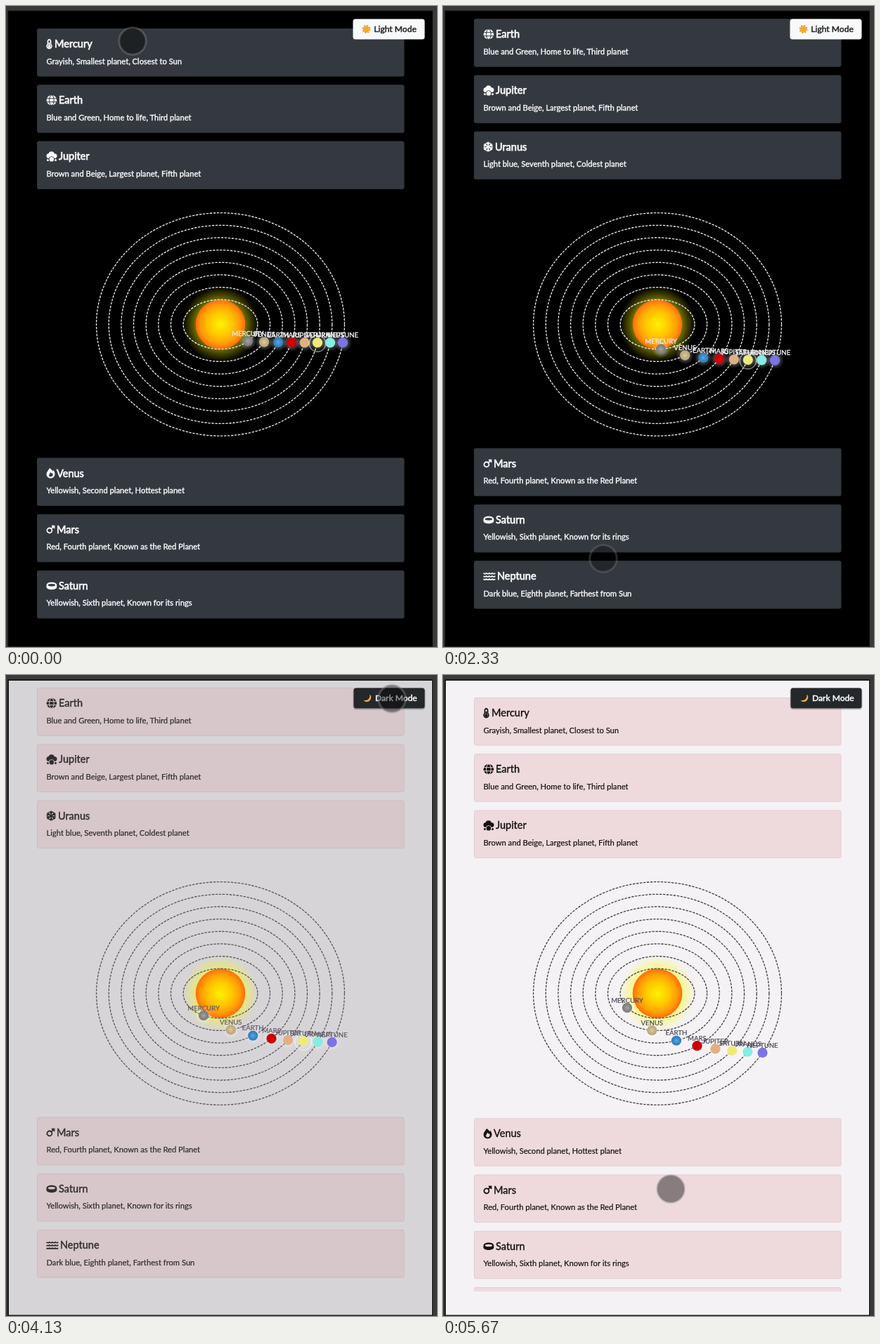
An HTML page for the animation above (5.74 s loop, 613 by 913 pixels).

```html
<!DOCTYPE html>
<html lang="en">
<head>
<meta charset="utf-8">
<title>Solar system</title>
<style>
html, body { margin: 0; width: 100%; height: 100%; overflow: hidden; background: #3a3a3a; }
svg { display: block; font-family: Lato, "Open Sans", sans-serif; }
.page { fill: var(--page); }
.card { fill: var(--card); stroke: var(--edge); }
.ink, text { fill: var(--ink); }
.line { fill: none; stroke: var(--ink); stroke-width: 1.8; }
.hole { fill: var(--card); }
.cut { fill: none; stroke: var(--card); stroke-width: 1; }
.title { font-size: 14.5px; stroke: var(--ink); stroke-width: calc(var(--bold) * 1.5px); }
.fact { font-size: 11.2px; stroke: var(--ink); stroke-width: calc(var(--bold) * .8px); }
.orbit { fill: none; stroke: var(--orbit); stroke-width: 1.3; stroke-dasharray: 3.4 1.6; }
.name { font-size: 9.6px; text-anchor: middle; fill: var(--name); stroke: var(--name); stroke-width: calc(var(--bold) * .8px); }
.mode { font-size: 12.1px; stroke-width: .5px; }
</style>
</head>
<body>
<svg id="stage" width="613" height="913" viewBox="0 0 613 913"></svg>
<script>
const LOOP = 5740, FRAME = 200 / 3, LAST = 85;
const CX = 305, CY = 453.5, MAX_SCROLL = 94, CLICK = 3870;

const icons = {
  thermometer: `<path class="line" d="M2-4a2 2 0 0 1 4 0v4.6a3.3 3.3 0 1 1-4 0z"/>
    <circle class="ink" cx="4" cy="3.4" r="2"/><path class="line" d="M4 3v-5"/>`,
  globe: `<circle class="ink" cx="7.4" r="7.3"/><ellipse class="cut" cx="7.4" rx="3.3" ry="7.3"/>
    <path class="cut" d="M0-2.5h15M0 2.5h15"/>`,
  cloud: `<g class="ink"><circle cx="3.5" cy="-.8" r="3.5"/><circle cx="7.2" cy="-3" r="4.1"/>
    <circle cx="11.6" cy="-.8" r="3.4"/><path d="M3-2h9v4.7H3z"/><circle cx="2" cy="5.2" r="1.5"/>
    <circle cx="13" cy="5.2" r="1.5"/><circle class="cut" cx="7.4" cy="4" r="3.8"/><circle cx="7.4" cy="4" r="3.2"/></g>`,
  snow: [0, 60, 120].map(a => `<path class="line" transform="translate(6.7) rotate(${a})"
    d="M0-7V7M-2.5-6L0-3.6 2.5-6M-2.5 6L0 3.6 2.5 6"/>`).join(""),
  flame: `<path class="ink" d="M4.6-7.2C6.5-6 8-4.4 8.8-3L10-4.4C11.6-2 12-.2 12 1.4A6 5.8 0 0 1 0 1.4C0-1.6 3-4.4 4.6-7.2z"/>
    <path class="hole" d="M6-1.6L7.4.4 8.4-.4C10.4 3.6 8 5 6 5S2 3.4 6-1.6z"/>`,
  mars: `<g class="line"><circle cx="4.4" cy="1.3" r="3.5"/><path d="M7-1.3L11-5M7.4-5H11v3.6"/></g>`,
  ring: `<path class="ink" d="M0-1C0-6.6 14.8-6.6 14.8-1V1.6C14.8 6.6 0 6.6 0 1.6z"/>
    <ellipse class="hole" cx="7.4" cy="-1.2" rx="5.2" ry="1.8"/>`,
  water: [-4.2, 0, 4.2].map(y => `<path class="line" d="M0 ${y}q2 1.6 4.2 0 2 1.6 4.2 0 2 1.6 4.2 0 2 1.6 4.2 0"/>`).join("")
};

// name, icon, title offset, fact, planet colour
const planets = [
  ["Mercury", "thermometer", 12, "Grayish, Smallest planet, Closest to Sun", "#8d8d8d"],
  ["Venus", "flame", 15, "Yellowish, Second planet, Hottest planet", "#d8bf8c"],
  ["Earth", "globe", 18, "Blue and Green, Home to life, Third planet", "#3090da"],
  ["Mars", "mars", 15, "Red, Fourth planet, Known as the Red Planet", "#ce0000"],
  ["Jupiter", "cloud", 18, "Brown and Beige, Largest planet, Fifth planet", "#e0b083"],
  ["Saturn", "ring", 18, "Yellowish, Sixth planet, Known for its rings", "#eeea78"],
  ["Uranus", "snow", 17, "Light blue, Seventh planet, Coldest planet", "#86ede4"],
  ["Neptune", "water", 20, "Dark blue, Eighth planet, Farthest from Sun", "#7b73e6"]
];
const orbit = i => [52.9 + 17.65 * i, 35.3 + 17.65 * i];

const card = ([name, icon, dx, fact], row) => `<g transform="translate(44.5 ${15 + row * 80.2})">
  <rect class="card" width="521.5" height="67.5" rx="2"/>
  <g transform="translate(13 21.5)">${icons[icon]}</g>
  <text class="title" x="${12.5 + dx}" y="26.6">${name}</text>
  <text class="fact" x="13" y="50">${fact}</text></g>`;

const list = (id, y, parity) => `<g transform="translate(0 ${y})" clip-path="url(#view)"><g id="${id}">
  ${planets.filter((p, i) => i % 2 === parity).map(card).join("")}</g></g>`;

const planet = ([name, , , , color], i) => `<g class="planet">
  <circle r="13" fill="url(#halo)"/>
  ${name === "Saturn" ? '<circle cy="1.2" r="11.7" fill="none" stroke="#fff" stroke-opacity=".5" stroke-width="1.6"/>' : ""}
  <circle r="7.1" fill="${color}"/>
  ${i < 3 ? '<circle r="7.1" fill="url(#shine)"/>' : ""}
  <text class="name" y="-7.4">${name.toUpperCase()}</text></g>`;

const stop = (at, color, alpha = 1) => `<stop offset="${at}" stop-color="${color}" stop-opacity="${alpha}"/>`;
const radial = (id, ...stops) => `<radialGradient id="${id}">${stops.join("")}</radialGradient>`;

stage.innerHTML = `<defs>
  <clipPath id="view"><rect x="40" width="530" height="249"/></clipPath>
  ${radial("sun", stop(0, "#fff200"), stop(.5, "#ffc400"), stop(.8, "#ff9a08"), stop(1, "#ff6a10"))}
  ${radial("glow", stop(.62, "#ff0", .48), stop(.8, "#ff0", .24), stop(1, "#ff0", 0))}
  ${radial("halo", stop(.45, "#fff", .3), stop(1, "#fff", 0))}
  ${radial("shine", stop(0, "#fff", .25), stop(1, "#000", .12))}
  </defs>
  <rect x="2.5" y="6.5" width="604.5" height="906" fill="#0c0c0c"/>
  <rect class="page" x="4" y="8" width="602" height="903.5"/>
  ${list("upper", 17.5, 0)}${list("lower", 629, 1)}
  <g transform="translate(${CX} ${CY})">
    <circle r="54" fill="url(#glow)"/><circle r="35.3" fill="url(#sun)"/>
    ${planets.map((p, i) => `<ellipse class="orbit" rx="${orbit(i)[0]}" ry="${orbit(i)[1]}"/>`).join("")}
    ${planets.map(planet).join("")}
  </g>
  <g id="toLight">
    <rect x="493.5" y="18.5" width="102" height="29" rx="3.5" fill="#f8f9fa"/>
    <circle cx="512.5" cy="33" r="5" fill="none" stroke="#d99a3a" stroke-width="2" stroke-dasharray="2 1.93"/>
    <circle cx="512.5" cy="33" r="4.6" fill="#f6a928"/>
    <text class="mode" x="523.3" y="37.3" style="fill:#222;stroke:#222">Light Mode</text>
  </g>
  <g id="toDark">
    <rect x="493.5" y="18.5" width="103" height="31" rx="4.5" opacity=".2"/>
    <rect x="494.5" y="18.5" width="101" height="29" rx="3.5" fill="#25282b"/>
    <path d="M517.5 27.5A6.2 6.2 0 1 1 508.5 36.3Q518.5 37 517.5 27.5z" fill="#f3a94a"/>
    <text class="mode" x="525" y="37.3" style="fill:#fff;stroke:#fff">Dark Mode</text>
  </g>
  <circle id="cursor" r="19.2" fill="#000" fill-opacity=".43" stroke="#808080" stroke-opacity=".42" stroke-width="3"/>`;

// time, x, y, opacity
const path = [
  [0, 180, 50, 1], [600, 180, 49, 1], [733, 182, 104, .6], [1270, 184, 106, .7],
  [1667, 258, 627, .8], [1870, 240, 755, .75], [2333, 228, 787, .75], [2480, 228, 787, .75],
  [2930, 592, 26, .8], [3200, 590, 24, .9], [3600, 561, 20, .95], [3800, 549, 33, 1],
  [4290, 549, 34, 1], [4470, 376, 198, 1], [4800, 371, 206, 1], [4950, 371, 208, 1],
  [5350, 326, 722, 1], [5667, 324, 732, 1]
];

const clamp = v => Math.max(0, Math.min(1, v));
const mix = (a, b, k) => a + (b - a) * k;
const easeOut = (t, start) => 1 - (1 - clamp((t - start) / 245)) ** 2;
const smooth = k => k * k * (3 - 2 * k);

// dark and light tones
const theme = {
  page: [[0, 0, 0], [244, 242, 245]],
  card: [[52, 57, 63], [238, 218, 221]],
  edge: [[49, 54, 60], [226, 207, 211]],
  ink: [[248, 248, 248], [20, 18, 20]],
  orbit: [[235, 235, 235], [65, 65, 65]],
  name: [[235, 235, 240], [75, 72, 85]]
};
const dots = [...document.querySelectorAll(".planet")];
const move = (el, x, y) => el.setAttribute("transform", `translate(${x} ${y})`);

function draw(t) {
  dots.forEach((dot, i) => {
    const a = 2 * Math.PI * (t / 1000 + 2.36) / (20 + 10 * i), [rx, ry] = orbit(i);
    move(dot, rx * Math.cos(a), ry * Math.sin(a));
  });
  move(upper, 0, -MAX_SCROLL * (easeOut(t, 600) - easeOut(t, 4450)));
  move(lower, 0, -MAX_SCROLL * (easeOut(t, 1900) - easeOut(t, 5510)));

  const light = clamp((t - CLICK) / 300);
  for (const [key, [dark, pale]] of Object.entries(theme))
    stage.style.setProperty("--" + key, `rgb(${dark.map((v, i) => Math.round(mix(v, pale[i], light)))})`);
  stage.style.setProperty("--bold", mix(.5, .25, light));
  toLight.style.display = t < CLICK ? "" : "none";
  toDark.style.display = t < CLICK ? "none" : "";

  const n = Math.max(1, path.findIndex(p => p[0] > t)), end = t >= path.at(-1)[0];
  const a = path[end ? path.length - 2 : n - 1], b = path[end ? path.length - 1 : n];
  const k = smooth(clamp((t - a[0]) / (b[0] - a[0])));
  move(cursor, mix(a[1], b[1], k), mix(a[2], b[2], k));
  cursor.style.opacity = mix(a[3], b[3], k);
}

const begin = performance.now();
function tick() {
  const t = (performance.now() - begin) % LOOP;
  draw(Math.min(LAST, Math.floor((t + 5) / FRAME)) * FRAME);
  requestAnimationFrame(tick);
}
tick();
</script>
</body>
</html>
```
